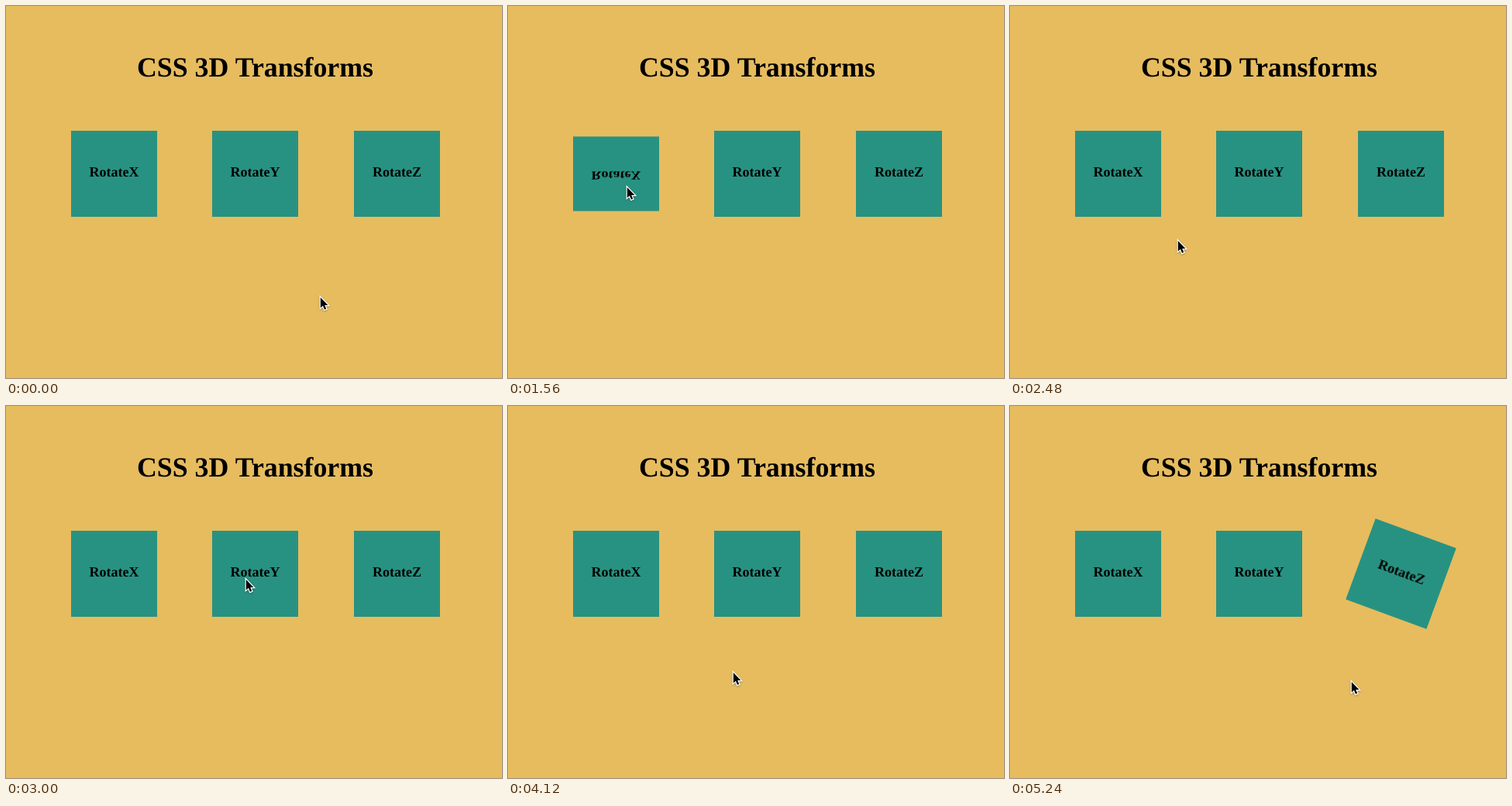
An HTML page that plays this animation: 640x480 px, repeating every 5280 ms.

```html
<!DOCTYPE html>
<html lang="en">
<head>
<meta charset="utf-8">
<title>CSS 3D Transforms</title>
<style>
  html, body { margin: 0; width: 100%; height: 100%; overflow: hidden; }
  body {
    position: relative;
    background: #e6bc5f;
    color: #000;
    font-family: "Liberation Serif", Times, serif;
    font-weight: bold;
    text-align: center;
    text-rendering: geometricPrecision;
  }
  h1 {
    position: absolute;
    left: 1px; top: 58.5px; width: 641px;
    margin: 0;
    font-size: 35.8px;
    line-height: 40px;
  }
  .box {
    position: absolute;
    top: 161px;
    width: 111px; height: 111px;
    box-sizing: border-box;
    border: 1px solid #26917e;
    background: #289282;
    font-size: 18px;
    line-height: 105px;
    animation: 5280ms ease infinite;
  }
  .x { left: 84px; animation-name: turn-x; }
  .y { left: 266px; animation-name: turn-y; }
  .z { left: 449px; animation-name: turn-z; }

  @keyframes turn-x {
    0%, 18.996% { transform: rotateX(0deg); }
    28.466%, 35.227% { transform: rotateX(150deg); }
    44.697%, 100% { transform: rotateX(0deg); }
  }
  @keyframes turn-y {
    0%, 56.818% { transform: rotateY(0deg); }
    66.288%, 67.803% { transform: rotateY(150deg); }
    77.273%, 100% { transform: rotateY(0deg); }
  }
  /* The loop cuts the way back short, so its easing is the first part of "ease". */
  @keyframes turn-z {
    0%, 83.902% { transform: rotate(0deg); }
    93.371% { transform: rotate(150deg); }
    93.845% {
      transform: rotate(150deg);
      animation-timing-function: cubic-bezier(.312, .089, .371, .753);
    }
    100% { transform: rotate(12.6deg); }
  }

  .cursor {
    position: absolute;
    left: 0; top: 0;
    width: 16px; height: 24px;
    overflow: visible;
    filter: drop-shadow(0 1px 1px rgba(0, 0, 0, .3));
    animation: point 5280ms linear infinite;
  }
  @keyframes point {
    0% { transform: translate(405px, 374px); }
    5.3% { transform: translate(405px, 374px); animation-timing-function: ease-in; }
    15.15% { transform: translate(330px, 365px); }
    18.94% { transform: translate(160px, 241px); }
    19.7% { transform: translate(156px, 237px); animation-timing-function: ease-out; }
    25% { transform: translate(153px, 232px); }
    33.33% { transform: translate(153px, 232px); animation-timing-function: ease-in; }
    35.23% { transform: translate(158px, 268px); }
    39.39% { transform: translate(180px, 340px); animation-timing-function: ease-out; }
    43.18% { transform: translate(200px, 358px); animation-timing-function: ease-in-out; }
    46.97% { transform: translate(216px, 301px); animation-timing-function: ease-in-out; }
    53.79% { transform: translate(236px, 318px); animation-timing-function: ease-out; }
    56.82%, 58.33% { transform: translate(309px, 222px); }
    64.39% { transform: translate(307px, 236px); }
    67.8% { transform: translate(300px, 276px); animation-timing-function: ease-out; }
    73.48% { transform: translate(290px, 342px); }
    78.03% { transform: translate(290px, 342px); animation-timing-function: ease-in; }
    83.9% { transform: translate(456px, 247px); animation-timing-function: ease-out; }
    86.36% { transform: translate(492px, 228px); }
    91.67% { transform: translate(482px, 238px); }
    93.94% { transform: translate(449px, 268px); }
    96.21% { transform: translate(445px, 276px); animation-timing-function: ease-out; }
    99.24%, 100% { transform: translate(440px, 354px); }
  }
</style>
</head>
<body>
  <h1>CSS 3D Transforms</h1>
  <div class="box x">RotateX</div>
  <div class="box y">RotateY</div>
  <div class="box z">RotateZ</div>
  <svg class="cursor" viewBox="0 0 16 24">
    <path d="M.8 2V15.4L3.9 12.8 6 17.8 8.2 16.8 6.2 12H10.4Z" stroke="#fff" stroke-width="2.4" paint-order="stroke"/>
  </svg>
</body>
</html>
```
